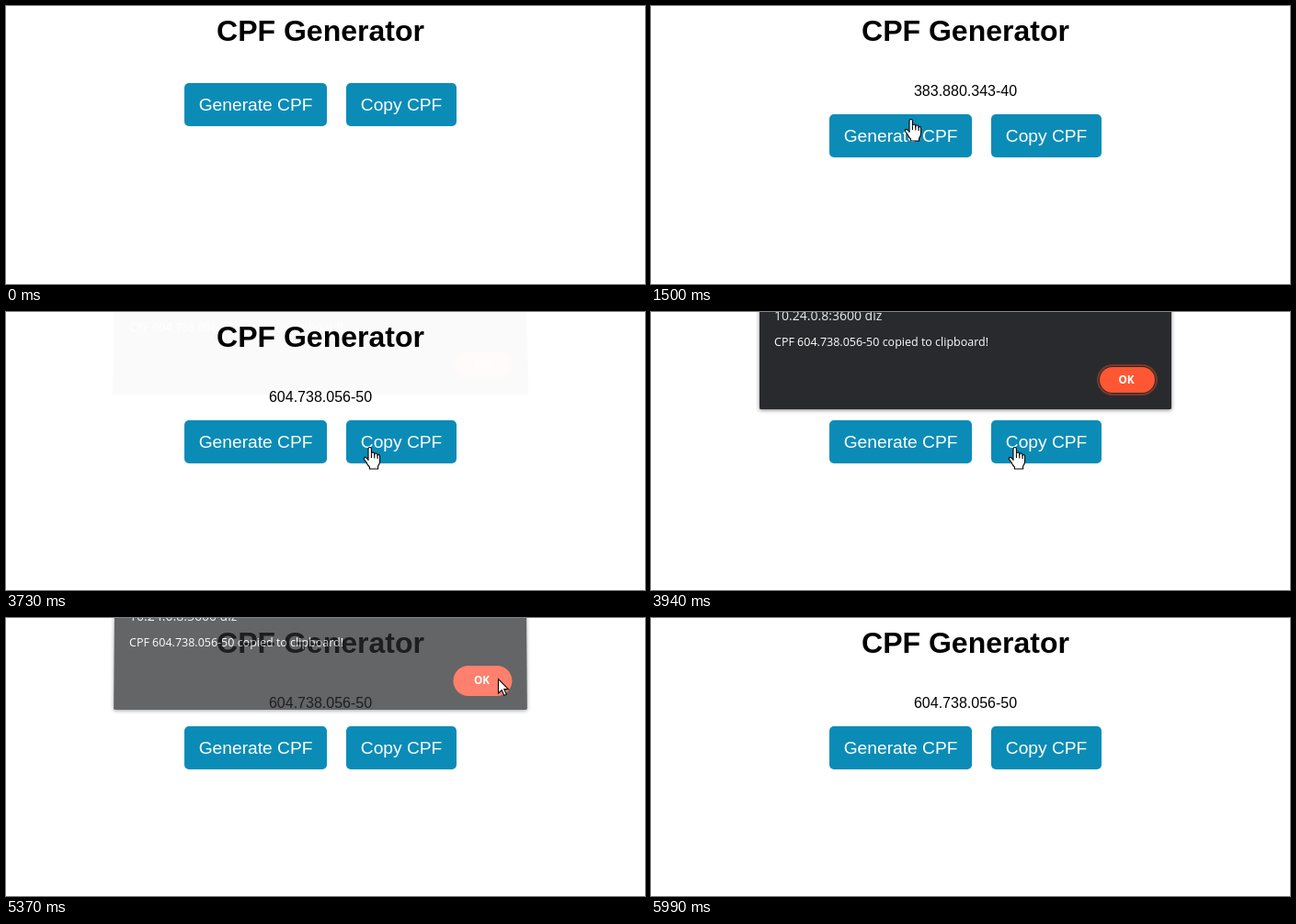
Animation, 695 px wide and 303 px high, one loop 6550 ms. Source, as an HTML page with a canvas:

```html
<!DOCTYPE html>
<html lang="en">
<head>
<meta charset="utf-8">
<title>CPF Generator</title>
<style>
  html, body { margin: 0; width: 100%; height: 100%; overflow: hidden; background: #fff; }
  canvas { display: block; }
</style>
</head>
<body>
<canvas id="stage" width="695" height="303"></canvas>
<script>
const LOOP = 6550, TICK = 70;
const BLUE = '#0b8cb7';
const ARIAL = '"Liberation Sans", Arial, sans-serif';
const UI = '"Open Sans", "Noto Sans", sans-serif';

const canvas = document.getElementById('stage');
const ctx = canvas.getContext('2d');
const layer = document.createElement('canvas');
layer.width = canvas.width;
layer.height = canvas.height;
const dialogCtx = layer.getContext('2d');

// Each click on the first button shows the next number.
const numbers = [
  [1170, '383.880.343-40'], [1770, '915.246.708-13'], [2040, '247.591.860-32'],
  [2240, '762.035.914-87'], [2440, '138.674.295-06'], [2700, '859.302.471-64'],
  [2970, '604.738.056-50']
];

const easeInOut = u => u * u * (3 - 2 * u);
const easeOut = u => 1 - (1 - u) * (1 - u);

// Pointer moves: start time, number of ticks, end point, easing.
const moves = [
  [390, 9, 283, 117, easeInOut],
  [1500, 1, 283, 123, easeInOut],
  [1570, 3, 283, 138, easeOut],
  [3190, 5, 396, 147, easeInOut],
  [4600, 7, 543, 66, easeInOut],
  [5090, 3, 535, 66, easeInOut],
  [5510, 6, 611, 106, easeInOut]
];

// Dialog states: time, opacity, lift above its resting place.
const dialogStates = [
  [3730, 0.015, 16], [3800, 0.45, 6], [3870, 0.85, 2], [3940, 1, 0],
  [5370, 0.72, 6], [5440, 0.296, 14], [5510, 0.03, 18], [5580, 0, 20]
];

const arrowShape = new Path2D(
  'M.5 .5 V16 L4.2 12.6 L6.8 18.4 L9.3 17.3 L6.8 11.6 H11.4 Z');
const handShape = new Path2D(
  'M-2 15 V2 Q-2 .5 -.3 .5 Q1.4 .5 1.4 2 V7.5 Q1.6 6 3.1 6 Q4.6 6 4.8 8 ' +
  'Q5.2 6.8 6.6 7 Q8 7.2 8.1 9 Q8.6 8.2 9.6 8.6 Q10.6 9 10.6 10.5 V16 ' +
  'Q10.6 18.5 8.6 21 V24 H-.6 V22 Q-3 19.5 -4.3 16.5 L-6.6 13.5 ' +
  'Q-7.2 11.8 -5.6 11.4 Q-4.2 11.3 -2 14 Z');
const knuckles = new Path2D('M1.4 7.5 V12 M4.8 8 V12.5 M8.1 9 V13');

const latest = (list, t) => list.filter(entry => entry[0] <= t).pop();

function text(c, label, x, y, font, color, align = 'left') {
  c.font = font;
  c.fillStyle = color;
  c.textAlign = align;
  c.fillText(label, x, y);
}

function box(c, x, y, w, h, r, color) {
  c.fillStyle = color;
  c.beginPath();
  c.roundRect(x, y, w, h, r);
  c.fill();
}

function pointerAt(t) {
  if (t < 390 || t >= 5990) return null;
  let x = 626, y = 284;
  for (const [start, count, endX, endY, ease] of moves) {
    if (t < start) break;
    const step = Math.floor((t - start) / TICK) + 1;
    const u = ease(Math.min(1, step / count));
    x += (endX - x) * u;
    y += (endY - y) * u;
  }
  return { x: Math.round(x), y: Math.round(y) };
}

function drawPage(number) {
  const top = number ? 118 : 84;
  text(ctx, 'CPF Generator', 342, 38, 'bold 32px ' + ARIAL, '#000', 'center');
  if (number) text(ctx, number, 342, 98, '16px ' + ARIAL, '#000', 'center');
  box(ctx, 194, top, 155, 47, 5, BLUE);
  box(ctx, 370, top, 120, 47, 5, BLUE);
  text(ctx, 'Generate CPF', 209.7, top + 30, '19.2px ' + ARIAL, '#fff');
  text(ctx, 'Copy CPF', 385.8, top + 30, '19.2px ' + ARIAL, '#fff');
}

function drawDialog(t, number, pointer) {
  const [, alpha, lift] = latest(dialogStates, t) || [0, 0, 0];
  if (!alpha) return;
  const c = dialogCtx;
  const bottom = 106 - lift, flare = lift / 7;
  c.clearRect(0, 0, 695, 303);

  c.save();
  c.shadowColor = 'rgba(0,0,0,.5)';
  c.shadowBlur = 4;
  c.shadowOffsetY = 1;
  c.fillStyle = '#292a2d';
  c.beginPath();
  c.moveTo(118, -8);
  c.lineTo(566, -8);
  c.lineTo(566 + flare, bottom - 1);
  c.lineTo(565 + flare, bottom);
  c.lineTo(119 - flare, bottom);
  c.lineTo(118 - flare, bottom - 1);
  c.fill();
  c.restore();

  c.save();
  c.translate(0, -lift);
  text(c, '10.24.0.8:3600 diz', 134, 9, '14px ' + UI, '#e8eaed');
  text(c, `CPF ${number} copied to clipboard!`, 134, 37, '12.5px ' + UI, '#fff');
  c.translate(flare / 2, 0);
  if (t < 5300) {
    const hover = pointer && pointer.y < 90 && pointer.x >= 488 && pointer.x < 548;
    box(c, 485, 57, 66, 34, 17, '#7b382b');
    box(c, 487, 59, 62, 30, 15, '#292a2d');
    box(c, 488, 60, 60, 28, 14, hover ? '#ff957f' : '#ff5734');
  } else {
    box(c, 486, 58, 64, 33, 16.5, '#ff5034');
  }
  text(c, 'OK', 517, 78, 'bold 11.7px ' + UI, '#fff', 'center');
  c.restore();

  ctx.globalAlpha = alpha;
  ctx.drawImage(layer, 0, 0);
  ctx.globalAlpha = 1;
}

function drawPointer({ x, y }, buttonTop) {
  const onButton = y >= buttonTop && y < buttonTop + 47 &&
    ((x >= 194 && x < 349) || (x >= 370 && x < 490));
  const shape = onButton ? handShape : arrowShape;
  ctx.save();
  ctx.translate(x, y);
  ctx.fillStyle = '#fff';
  ctx.strokeStyle = '#000';
  ctx.lineWidth = 1.1;
  ctx.fill(shape);
  ctx.stroke(shape);
  if (onButton) ctx.stroke(knuckles);
  ctx.restore();
}

function draw(t) {
  const entry = latest(numbers, t);
  const number = entry && entry[1];
  const pointer = pointerAt(t);
  ctx.fillStyle = '#fff';
  ctx.fillRect(0, 0, 695, 303);
  drawPage(number);
  drawDialog(t, number, pointer);
  if (pointer) drawPointer(pointer, number ? 118 : 84);
}

const start = performance.now();
function frame() {
  draw((performance.now() - start) % LOOP);
  requestAnimationFrame(frame);
}
frame();
</script>
</body>
</html>
```
